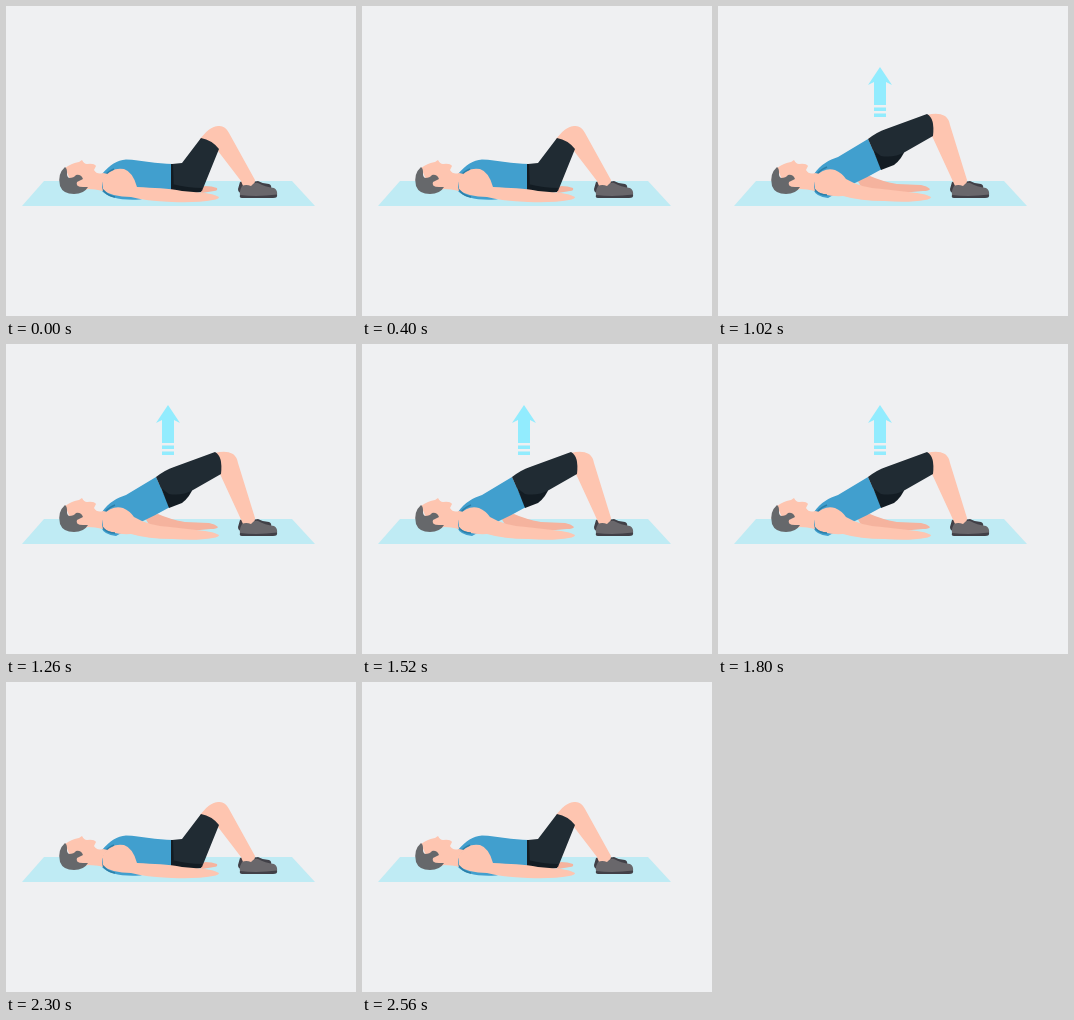
Write an HTML page that moves like this. It is 350x310 px and loops after 2580 ms.

```html
<!DOCTYPE html>
<html lang="en">
<head>
<meta charset="utf-8">
<title>Glute bridge</title>
<style>
  html, body { margin: 0; width: 100%; height: 100%; overflow: hidden; background: #eff0f2; }
  svg { display: block; width: 100%; height: 100%; }
  .mat { fill: #bfebf4; }
  .skin { fill: #fec5b0; }
  .shade { fill: #f5b39e; }
  .shirt { fill: #419fce; }
  .trim { fill: none; stroke: #2c7fa8; stroke-width: 1.6; }
  .shorts { fill: #202b33; }
  .dark { fill: #131c23; }
  .hair { fill: #66686b; }
  .shoe { fill: #69676b; }
  .sole { fill: #414047; }
  .arrow { fill: #92ecfe; }
</style>
</head>
<body>
<svg viewBox="0 0 350 310">
  <path class="mat" d="M38 175H286L309 200H16Z"/>

  <!-- far shoe -->
  <path class="sole" d="M234 176Q239 174 246 176L252 175Q257 178 263 178Q266 179 265 183L236 187Q232 187 232 183Z"/>

  <g id="down">
    <path class="skin" d="M194 133C200 126 204 121 212 120Q219 119 223 127L249 174Q249 179 245 181L237 180L235 175L212 145Z"/>
    <path class="shade" d="M190 184L199 180Q206 180 211 182Q212 185 208 185L196 187Z"/>
    <path class="shirt" d="M96 168C104 159 111 154 120 153.500C136 154 150 158 167 158L166 186L134 193.500Q105 195 96 185Z"/>
    <path class="shorts" d="M166 158L176 157L195 132Q206 134 213 143L196 185Q182 189 166 186Z"/>
    <path class="dark" d="M165 158H167L168 186H165ZM166 178Q182 182 196 182L195 186Q180 189 166 186Z"/>
    <path class="skin" d="M97 171Q106 161 118 163Q127 166 131 181C148 182 162 182 176 185L199 187Q208 188 213 191Q213 193 207 194Q191 197 166 196Q139 195 125 191Q106 191 97 184Z"/>
    <path class="trim" d="M108 163C96 168 91 180 99 186Q103 190 109 191"/>
  </g>

  <g id="up">
    <path class="skin" d="M209 109Q220 106 227 110Q231 113 232 119L249 174Q249 179 245 181L237 180L232 169L214 130Z"/>
    <path class="shade" d="M138 172L152 170Q163 175 179 178L203 179Q209 180 212 183Q211 185 205 185L182 187L145 184Z"/>
    <path class="shirt" d="M96 168C103 158 111 154 120 151L150 133L164 163Q150 171 137 177L110 192Q98 191 95 183Z"/>
    <path class="dark" d="M152 136L188 142Q184 153 176 159L163 164Z"/>
    <path class="shorts" d="M150 133Q159 126 168 123L209 108Q217 112 215 130L187 146Q176 152 163 150L155 144Z"/>
    <path class="skin" d="M97 171Q106 161 117 164Q124 167 128 173Q143 182 164 183L199 187Q208 188 213 191Q213 193 207 194Q191 197 166 195Q142 195 125 190Q106 191 97 184Z"/>
    <path class="trim" d="M109 161C96 166 91 180 98 185Q102 189 109 189"/>
    <path class="arrow" d="M162 61L174 79L168 76V99H156V76L150 79ZM156 101.500H168V105H156ZM156 107.500H168V111H156Z"/>
  </g>

  <!-- head -->
  <path class="skin" d="M59 162Q66 157 73 156L76 154Q78 158 81 158Q88 157 90 160L88 164Q91 169 97 167L102 168Q94 176 97 185Q89 183 82 183L70 187Z"/>
  <path class="hair" d="M59 161C63 164 59 170 63 172Q68 172 70 169Q75 168 77 173L71 176Q69 181 77 181L82 181Q78 188 68 188Q57 188 54 180Q51 168 59 161Z"/>

  <!-- near shoe -->
  <path class="shoe" d="M236 180Q240 178 245 180Q248 176 252 177Q259 181 268 182Q272 184 271 190L235 191Q232 187 236 180Z"/>
  <path class="sole" d="M234 189Q252 191 271 188.500Q272 192 267 192H236Q233 192 234 189Z"/>
</svg>
<script>
  const LOOP = 2580, RISE = 900, FALL = 2260;
  const down = document.getElementById("down");
  const up = document.getElementById("up");

  function draw() {
    const t = performance.now() % LOOP;
    const raised = t >= RISE && t < FALL;
    up.style.display = raised ? "" : "none";
    down.style.display = raised ? "none" : "";
    requestAnimationFrame(draw);
  }
  draw();
</script>
</body>
</html>
```
